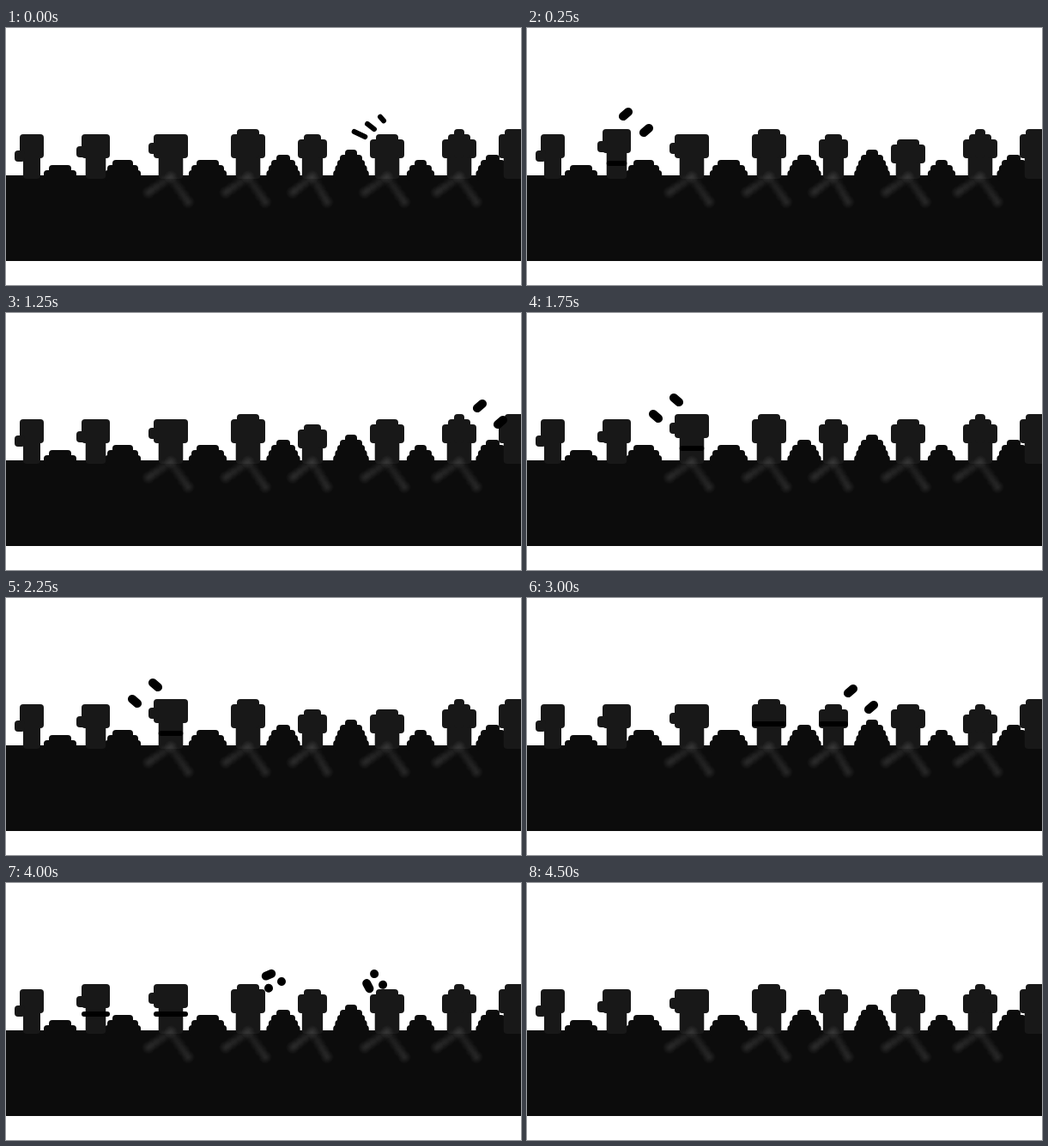
An HTML page with a canvas for the animation above (4750 ms loop, 600 px wide and 300 px high).

```html
<!DOCTYPE html>
<html lang="en">
<head>
<meta charset="utf-8">
<title>Theatre crowd</title>
<style>
html, body { margin: 0; width: 100%; height: 100%; overflow: hidden; background: #fff; }
canvas { display: block; width: 600px; height: 300px; }
</style>
</head>
<body>
<canvas id="stage" width="600" height="300"></canvas>
<script>
const ctx = document.getElementById('stage').getContext('2d');
const CELL = 6, STEP = 250, LOOP = 4750;
const FLOOR = 172, BOTTOM = 272, JAW = 152;
const BODY = '#0c0c0c', HEAD = '#181818', INK = '#000';

// Side views have a nose; front views have stepped hair rising from base.
const side = (x, w, nose) => ({ x, w, nose, base: 124, tiers: 1 });
const front = (x, w, base, tiers) => ({ x, w, base, tiers });
const heads = [
  side(16, 28, 143), side(88, 33, 138), side(172, 40, 134),
  front(262, 40, 124, 2), front(340, 34, 130, 2), front(424, 40, 130, 2),
  front(508, 40, 130, 3), front(574, 40, 124, 2)
];

// Seat neighbours: centre, top, half width of the crown.
const hump = (x, top, half) => ({ x, top, half });
const humps = [
  hump(63, 160, 13), hump(136, 154, 12), hump(235, 154, 13), hump(323, 148, 8),
  hump(402, 142, 7), hump(483, 154, 7), hump(567, 148, 8)
];

const mark = (kind, x, y, turn) => ({ kind, x, y, turn });

// Poses: head index + d (down), u (up) or m (mouth open), then any marks.
const steps = [
  ['', mark(slashes, 425, 115, -1)],
  ['1u 5d', mark(pair, 127, 110, 1)],
  [''],
  ['0d 1u 4d 6d', mark(pair, 127, 110, 1)],
  [''],
  ['4d', mark(pair, 564, 118, 1)],
  ['0d 5d'],
  ['2u', mark(pair, 162, 111, -1)],
  [''],
  ['2u 4d 5d', mark(pair, 162, 111, -1)],
  ['2m'],
  ['5d'],
  ['3m 4m 6d', mark(pair, 389, 118, 1)],
  [''],
  ['2m', mark(pair, 323, 114, 1)],
  ['5d'],
  ['1m 2m', mark(splash, 311, 115, 240), mark(splash, 430, 115, 145)],
  ['6d', mark(pair, 69, 118, -1)],
  ['']
];

function block(x, y, w, h) {
  ctx.beginPath();
  ctx.roundRect(x, y, w, h, Math.min(4, h / 2));
  ctx.fill();
}

function stroke(x, y, length, angle, width) {
  const dx = Math.cos(angle) * length / 2, dy = Math.sin(angle) * length / 2;
  ctx.lineWidth = width;
  ctx.beginPath();
  ctx.moveTo(x - dx, y - dy);
  ctx.lineTo(x + dx, y + dy);
  ctx.stroke();
}

function slashes(x, y, dir) {
  for (let i = -1; i <= 1; i++) {
    stroke(x + i * 13 * dir, y + i * 9, 10 + i * 4, 0.65 - i * 0.2, 6);
  }
}

function pair(x, y, dir) {
  for (const i of [-1, 1]) stroke(x + i * 12 * dir, y + i * 9.5, 8, -0.7 * dir, 10);
}

function splash(x, y, degrees) {
  for (let i = 0; i < 3; i++) {
    const a = (degrees + i * 120) * Math.PI / 180;
    stroke(x + 10 * Math.cos(a), y + 9 * Math.sin(a), i ? 0.1 : 7, a + 1.7, 10);
  }
}

function drawCrowd() {
  ctx.fillStyle = BODY;
  ctx.fillRect(0, FLOOR, 600, BOTTOM - FLOOR);
  for (const { x, top, half } of humps) {
    for (let k = 0; top + k * CELL < FLOOR; k++) {
      const r = half + CELL * k ** 0.6;
      block(x - r, top + k * CELL, r * 2, FLOOR + CELL - top - k * CELL);
    }
  }
}

function glow(x, y, strength) {
  const g = ctx.createRadialGradient(x, y, 1, x, y, 8);
  g.addColorStop(0, `rgba(255,255,255,${strength})`);
  g.addColorStop(1, 'rgba(255,255,255,0)');
  ctx.fillStyle = g;
  ctx.fillRect(x - 8, y - 8, 16, 16);
}

// Faint arms run from the neck down to both sides.
function drawArms({ x, w }) {
  const cx = x + w / 2;
  for (const [ex, ey] of [[x - 6, 190], [x + w, 201]]) {
    for (let t = 0; t <= 1; t += 0.25) {
      glow(cx + (ex - cx) * t, FLOOR + 2 + (ey - FLOOR) * t, 0.06 + 0.04 * t);
    }
  }
}

function drawHead({ x, w, nose, base, tiers }, pose) {
  const inset = w / 7, neck = w - inset * 2;
  const dy = pose === 'd' ? CELL : pose && nose ? -CELL : 0;
  ctx.fillStyle = HEAD;
  block(x + inset, 138, neck, FLOOR + 4 - 138);
  for (let k = 0; k < tiers; k++) {
    const cut = k * 7, y = base - k * CELL;
    block(x + cut, y + dy, w - cut * 2, JAW - y);
  }
  if (nose) block(x - CELL, nose + dy, CELL * 2, 13);
  ctx.fillStyle = INK;
  if (pose === 'u') block(x + inset, 155, neck, CELL);
  if (pose === 'm') block(x, nose ? 150 : 144, w, CELL);
}

function draw([poses, ...marks]) {
  ctx.fillStyle = '#fff';
  ctx.fillRect(0, 0, 600, 300);
  drawCrowd();
  const pose = Object.fromEntries(poses.split(' ').map(p => [p[0], p[1]]));
  heads.forEach((h, i) => drawHead(h, pose[i]));
  heads.slice(2, 7).forEach(drawArms);
  ctx.strokeStyle = INK;
  ctx.lineCap = 'round';
  for (const m of marks) m.kind(m.x, m.y, m.turn);
}

let start;
function tick(now) {
  start ??= now;
  draw(steps[Math.floor((now - start) % LOOP / STEP)]);
  requestAnimationFrame(tick);
}
draw(steps[0]);
requestAnimationFrame(tick);
</script>
</body>
</html>
```
